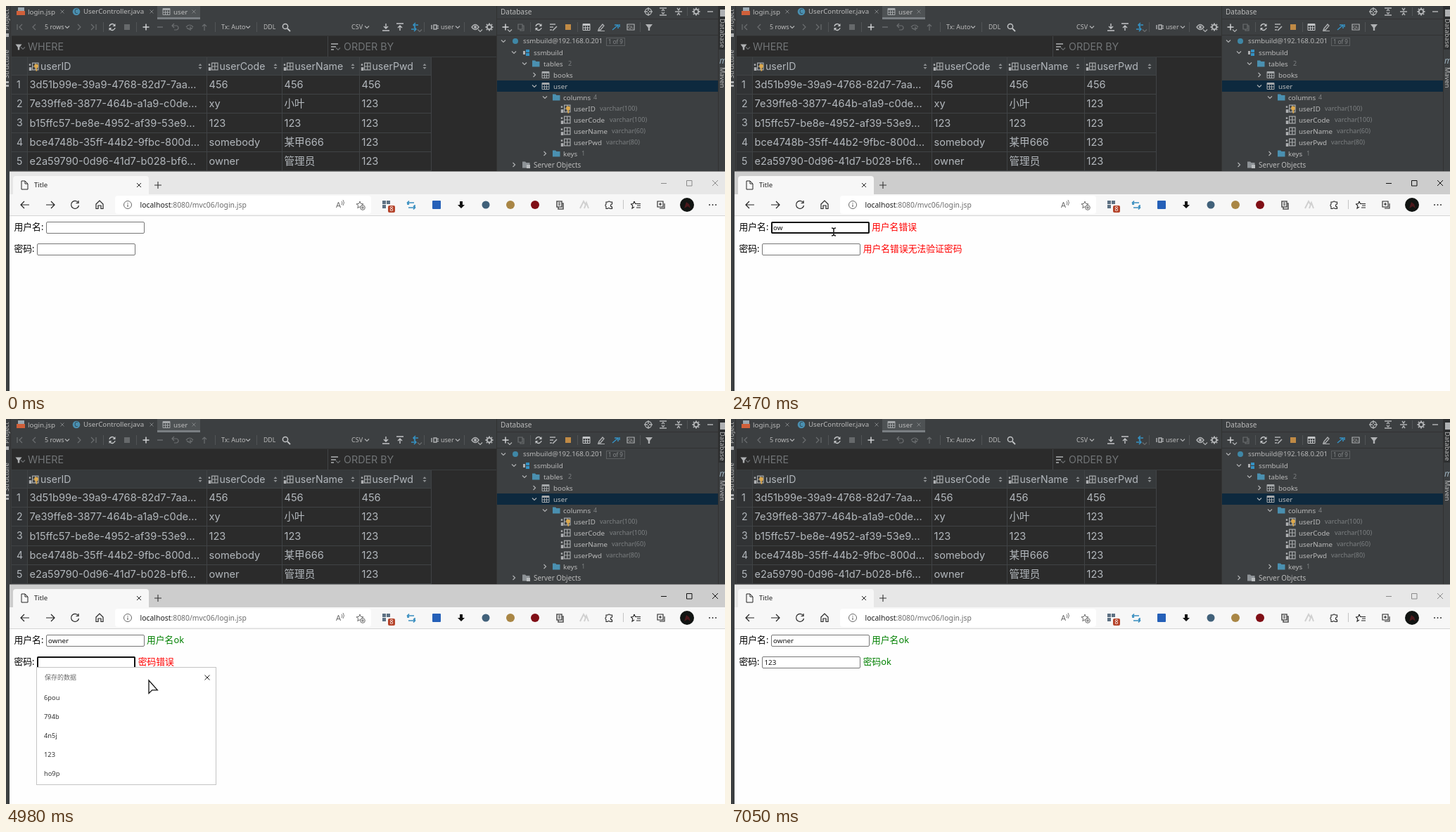
Write an HTML page that moves like this. It is 1022 by 548 pixels and loops after 7100 ms.

```html
<!DOCTYPE html>
<html lang="zh-CN">
<head>
<meta charset="utf-8">
<title>Login check</title>
<style>
  html, body { margin: 0; width: 100%; height: 100%; overflow: hidden; background: #3c3f41; }
  svg { display: block; font-family: "Noto Sans", "Noto Sans CJK SC", "Noto Sans CJK", sans-serif; }
  .grid { font-family: Inter, "Noto Sans CJK SC", "Noto Sans CJK", sans-serif; }
</style>
</head>
<body>
<script>
const LOOP = 7100;
const UI = '#bbbbbb', ICON = '#afb1b3', DIM = '#6b6e70', BLUE = '#3592c4', LINE = '#515456';

// Drawing helpers: each returns SVG markup; text is placed by its vertical centre.
const rect = (x, y, w, h, fill, extra = '') =>
  `<rect x="${x}" y="${y}" width="${w}" height="${h}" fill="${fill}" ${extra}/>`;
const text = (x, y, str, size = 9.8, fill = UI, extra = '') =>
  `<text x="${x}" y="${y + size * .36}" font-size="${size}" fill="${fill}" ${extra}>${str}</text>`;
const path = (x, y, d, color = ICON, width = 1.2, fill = 'none', extra = '') =>
  `<path transform="translate(${x} ${y})" d="${d}" stroke="${color}" stroke-width="${width}" fill="${fill}" ${extra}/>`;
const solid = (x, y, d, fill = ICON) => path(x, y, d, 'none', 0, fill);
const disc = (x, y, r, fill, stroke = 'none', width = 1, extra = '') =>
  `<circle cx="${x}" cy="${y}" r="${r}" fill="${fill}" stroke="${stroke}" stroke-width="${width}" ${extra}/>`;
const each = (list, draw) => list.map(draw).join('');

const chevronDown = (x, y, c = ICON) => path(x, y, 'M-3-1.5L0 1.5L3-1.5', c);
const chevronRight = (x, y, c = ICON) => path(x, y, 'M-1.5-3L1.5 0L-1.5 3', c);
const cross = (x, y, r, c, w = 1) => path(x, y, `M${-r}${-r}L${r} ${r}M${r} ${-r}L${-r} ${r}`, c, w);
const plus = (x, y, r, c = '#d0d2d4', w = 1.5) => path(x, y, `M${-r} 0H${r}M0 ${-r}V${r}`, c, w);
const bar = (x, y, h = 14) => rect(x, y - h / 2, 1, h, LINE);
const reload = (x, y) => path(x, y, 'M-4-1A4 4 0 0 1 3-3M4 1A4 4 0 0 1-3 3', '#c2c4c6', 1.4) +
  solid(x, y, 'M4.5-5V-1H.5ZM-4.5 5V1H-.5Z', '#c2c4c6');
const tableIcon = (x, y, c = '#a5a8aa') =>
  path(x, y, 'M-5-4.5H5V4.5H-5ZM-5 1H5M-1.5-1.5V4.5M1.5-1.5V4.5', c, 1) + rect(x - 5, y - 5, 10, 3, c);
const columnIcon = (x, y, key) => `<g transform="translate(${x} ${y}) scale(1.2)">` +
  path(0, 0, 'M-2-4H5V4H-2ZM1.5-4V4M-2 0H5', '#a5a8aa', 1) + rect(-6, -3, 2, 2, ICON) + rect(-6, 1, 3, 4, ICON) +
  (key ? disc(2.5, -.5, 2.4, '#dca84c') + rect(2, 0, 1.5, 5.5, '#dca84c') : '') + '</g>';
const folder = (x, y, c = '#4a90b0') => solid(x, y, 'M-5-4.5H-1L.5-3H5.5V4.5H-5Z', c);
const gear = (x, y) => disc(x, y, 3.2, 'none', ICON, 2) +
  path(x, y, 'M0-5.5V-4M0 4V5.5M-5.5 0H-4M4 0H5.5M-4-4L-3-3M3 3L4 4M4-4L3-3M-3 3L-4 4', ICON, 2);
const funnel = (x, y, r = 5) => solid(x, y, `M${-r}${-r + 1}H${r}L1.2 1V${r}H-1.2V1Z`);

function editorTabs() {
  return rect(215, 0, 61, 19, '#4e5254') + rect(215, 16, 61, 3, '#7a7f83') +
    rect(17, 2, 9, 10, '#9aa7b0') + rect(15, 7, 12, 6, '#d0603a') + text(31, 8, 'login.jsp') +
    disc(100, 8, 5.3, '#4a8fb0') + text(97.3, 8, 'C', 8, '#2b3e48') + text(110, 8, 'UserController.java', 9.7) +
    tableIcon(228, 8) + text(238, 8, 'user') +
    each([80, 207, 267], x => cross(x, 8, 2.5, '#7d8082'));
}

function gridToolbar() {
  const y = 30;
  return path(20, y, 'M-4-4V4M3-4L-1 0L3 4', DIM) + path(40, y, 'M2-4L-2 0L2 4', DIM) +
    text(55, y, '5 rows', 9) + chevronDown(87, y) + path(104, y, 'M-2-4L2 0L-2 4', DIM) +
    path(124, y, 'M4-4V4M-3-4L1 0L-3 4', DIM) + each([138, 185, 297, 356, 594, 651], x => bar(x, y)) +
    reload(151, y) + rect(168, 26, 8, 8, '#66696b') + plus(199, y, 4.5) + path(219, y, 'M-4 0H4', DIM, 1.4) +
    path(240, y, 'M-4-2H2A3 3 0 0 1 2 4H-1M-1-5L-4-2L-1 1', DIM) +
    path(261, y, 'M-5 0Q0-6 5 0M-4 1Q0 5 4 1M1-1V5', DIM) + path(282, y, 'M0 5V-4M-3-1L0-4L3-1', DIM) +
    text(306, y, 'Tx: Auto', 9) + chevronDown(344, y) + text(366, y, 'DDL', 8.7) +
    disc(397, 29, 3.6, 'none', '#c2c4c6', 1.5) + path(400, 32, 'M0 0L4 4', '#c2c4c6', 1.8) +
    text(491, y, 'CSV', 9) + chevronDown(513, y) +
    path(540, y, 'M0-5V2M-3-1L0 2L3-1M-5 5H5', '#c2c4c6', 1.4) + path(560, y, 'M0 5V-2M-3 1L0-2L3 1M-5-5H5', '#c2c4c6', 1.4) +
    path(581, y, 'M-5 3H1M-1 0L2 3L-1 6M5-3H-1M1-6L-2-3L1 0', BLUE, 1.5) + chevronDown(588, 35, DIM) +
    path(610, y, 'M-5-3V3M-2-3H2V3H-2ZM2-1.5H5M2 1.5H5', ICON, 1.4) + text(618, y, 'user', 9) + chevronDown(642, y) +
    path(667, y, 'M-5 0Q0-7 5 0Q0 7-5 0Z', ICON, 1.4) + disc(667, y, 2, ICON) + chevronDown(674, 35) + gear(687, y);
}

function dataGrid() {
  const columns = [30, 285, 392, 502, 604];
  const rows = [
    ['3d51b99e-39a9-4768-82d7-7aa...', '456', '456', '456'],
    ['7e39ffe8-3877-464b-a1a9-c0de...', 'xy', '小叶', '123'],
    ['b15ffc57-be8e-4952-af39-53e9...', '123', '123', '123'],
    ['bce4748b-35ff-44b2-9fbc-800d...', 'somebody', '某甲666', '123'],
    ['e2a59790-0d96-41d7-b028-bf6...', 'owner', '管理员', '123']
  ];
  const heads = ['userID', 'userCode', 'userName', 'userPwd'];
  const headSize = 14.1, cellSize = 14.6, ink = '#b3b8bd';
  return rect(8, 42, 690, 194, '#2b2b2b') + rect(8, 73, 596, 26, '#36393b') + rect(8, 99, 22, 137, '#313335') +
    rect(8, 42, 690, 1, '#323232') + rect(8, 72, 690, 1, '#3a3d3f') + rect(457, 43, 1, 29, '#414446') +
    funnel(18, 58, 4.5) + chevronDown(24, 60, DIM) + text(31, 58, 'WHERE', 14.3, '#717476') +
    path(467, 58, 'M-5-4H5M-5 0H2M-5 4H-1', ICON, 1.6) + chevronDown(472, 61, DIM) + text(480, 58, 'ORDER BY', 14.3, '#717476') +
    each(columns, x => rect(x, 73, 1, 162, '#404345')) +
    each([98, 125, 152, 180, 207, 234], y => rect(8, y, 596, 1, '#404345')) +
    each(heads, (h, i) => columnIcon(columns[i] + 10, 86, !i) + text(columns[i] + (i ? 18.5 : 19), 86, h, headSize, ink) +
      solid(columns[i + 1] - 9, 86, 'M-2.5-1L0-4L2.5-1ZM-2.5 1L0 4L2.5 1Z', '#8c8f91')) +
    each(rows, (row, r) => {
      const y = 112 + r * 27.2;
      return text(15, y, r + 1, headSize, ink) + each(row, (s, i) => text(columns[i] + 3.5, y, s, cellSize, ink));
    });
}

function databasePanel() {
  const leaf = (y, name, type, x, key) => columnIcon(796, y, key) + text(807, y, name) + text(x, y, type, 9.1, '#7d8082');
  return rect(697, 0, 1, 236, '#323232') + rect(698, 0, 314, 236, '#3c3f41') + rect(698, 18, 314, 1, '#323232') +
    rect(698, 41, 314, 1, '#323232') + text(703, 8, 'Database', 10) +
    disc(913, 8, 4.5, 'none', ICON, 1.3) + path(913, 8, 'M0-6V-1M0 1V6M-6 0H-1M1 0H6', ICON, 1.3) +
    path(934, 8, 'M-5-5H5M-5 5H5M-2-1L0-3L2-1M-2 1L0 3L2 1', ICON, 1.4) +
    path(956, 8, 'M-5 0H5M-2-5L0-2L2-5M-2 5L0 2L2 5', ICON, 1.4) + bar(968, 8, 12) + gear(981, 8) + path(1001, 8, 'M-4 0H4', ICON, 1.5) +
    plus(710, 30, 4.5) + chevronDown(716, 35) + path(732, 30, 'M-4-4H2V3H-4ZM-1 3V5H4V-2H2', DIM) + each([745, 812, 901], x => bar(x, 30)) +
    reload(757, 30) + path(778, 30, 'M-5-4H3M-5 0H0M-5 4H-2M-1 5L5-1', ICON, 1.7) + rect(795, 26, 8, 8, '#c08a45') + tableIcon(825, 30, '#c2c4c6') +
    path(846, 30, 'M-3 2L2-4L4-2L-1 4L-4 4Z', ICON, 1.3) + rect(841, 35, 10, 1, ICON) +
    path(867, 30, 'M-5 4L2-2M-2-3H3V2M5-4V0', BLUE, 1.5) + path(888, 30, 'M-5-4H5V4H-5Z', ICON) + text(884, 30, 'QL', 6, UI) + funnel(914, 30) +
    rect(698, 106, 314, 16, '#0d293e') +
    each([[707, 50], [722, 66], [737, 82], [751, 114], [766, 130]], p => chevronDown(...p)) +
    each([[751, 98], [766, 210], [722, 226]], p => chevronRight(...p)) +
    disc(724, 50, 4, '#3f87a6') + text(735, 50, 'ssmbuild@192.168.0.201', 9.7) +
    rect(853.5, 45.5, 26, 11, 'none', 'stroke="#5c5f61"') + text(856, 51, '1 of 9', 8, '#85888a') +
    rect(735, 64, 3, 5, ICON) + rect(739, 62, 5, 4, BLUE) + rect(739, 67, 5, 4, BLUE) + text(750, 66, 'ssmbuild') +
    folder(753, 82) + text(764, 82, 'tables') + text(799, 82, '2', 9, '#7d8082') +
    tableIcon(767, 98) + text(778, 98, 'books') + tableIcon(767, 114) + text(778, 114, 'user') +
    folder(782, 130) + text(792, 130, 'columns') + text(835, 130, '4', 9, '#7d8082') +
    leaf(146, 'userID', 'varchar(100)', 844, true) + leaf(162, 'userCode', 'varchar(100)', 858) +
    leaf(178, 'userName', 'varchar(60)', 861) + leaf(194, 'userPwd', 'varchar(80)', 853) +
    folder(782, 210) + text(792, 210, 'keys') + text(818, 210, '1', 9, '#7d8082') +
    folder(739, 226, '#8d9296') + rect(740, 226, 5, 5, '#b9bcbe') + text(750, 226, 'Server Objects', 9.9);
}

function sideStrips() {
  const turned = (x, y, angle, str, fill = UI) =>
    `<text transform="translate(${x} ${y}) rotate(${angle})" font-size="9.4" fill="${fill}">${str}</text>`;
  return rect(6, 0, 1, 236, '#323232') + turned(4, 35, -90, 'Project') + turned(4, 103, -90, 'Structure') +
    rect(0, 39, 4, 5, ICON) + rect(0, 107, 4, 3, ICON) + rect(0, 112, 4, 3, ICON) +
    rect(1012, 0, 10, 236, '#3c3f41') + rect(1012, 0, 10, 62, '#2d2f30') + rect(1012, 0, 1, 236, '#323232') +
    rect(1015, 5, 7, 10, ICON) + turned(1015, 18, 90, 'Database') + turned(1015, 87, 90, 'Maven') +
    text(1014, 78, 'm', 12, '#9fb4c0', 'font-style="italic"');
}

function browser() {
  const y = 283, ink = '#252525', grey = '#686868';
  const star = 'M0-5L1.5-1.5L5-1.2L2.3 1L3.2 4.6L0 2.7L-3.2 4.6L-2.3 1L-5-1.2L-1.5-1.5Z';
  return rect(5, 235, 1017, 313, '#fefefe') + rect(5, 235, 1017, 34, '#cdcdcd', 'id="titleBar"') + rect(5, 235, 1017, 1, '#8b8b8b') +
    rect(5, 268, 1017, 31, '#f7f7f7') + solid(0, 0, 'M10 269V246Q10 242 14 242H199Q203 242 203 246V269Z', '#f7f7f7') +
    path(26, 255, 'M-4-6H1L5-2V6H-4ZM1-6V-2H5', ink, 1) + text(40, 255, 'Title', 9.6, '#222') + cross(189, 255, 3, ink) + plus(216, 255, 5, '#333', 1.1) +
    `<g id="windowButtons">${path(935, 252, 'M-4 .5H4', 'currentColor', 1)}${path(971, 252, 'M-3.5-3.5H4V4H-3.5Z', 'currentColor', 1)}${cross(1008, 252, 4, 'currentColor')}</g>` +
    rect(5, 298, 1017, 1, '#d5d5d5') + path(27, y, 'M6 0H-6M-1-5L-6 0L-1 5', ink) + path(63, y, 'M-6 0H6M1-5L6 0L1 5', ink) +
    path(98, y, 'M4.5-3.5A5.5 5.5 0 1 0 5.5 1M5-6V-2.5H1.5', ink) + path(133, y, 'M-5-1L0-6L5-1V5.5H2V1H-2V5.5H-5Z', ink) +
    rect(155, 270, 364, 26, '#fff', 'rx="4"') + disc(173, y, 5.5, 'none', grey) + path(173, y, 'M0-.5V3M0-3V-1.8', grey) +
    text(190.5, y, 'localhost<tspan fill="#6d6d6d">:8080/mvc06/login.jsp</tspan>', 10.4, '#1b1b1b') +
    text(469, y, 'A', 11, grey) + path(477, 280, 'M0-2Q2 0 0 3M2-4Q5 0 2 4', grey, .9) +
    path(503, y, star, grey, 1) + disc(507, 287, 3.3, '#fff', grey) + plus(507, 287, 2, grey, 1) +
    each([[535, 277], [541, 277], [535, 283]], p => rect(...p, 5, 5, '#5d7183')) + rect(543, 284, 10, 10, '#b5432a', 'rx="2"') + text(545.4, 289, '8', 8.5, '#fff') +
    path(576, y, 'M-5 0V-3H4M-3-5.5L-5.5-3L-3-.5M5 0V4H-4M3 1.5L5.5 4L3 6.5', '#3a8fc0', 1.6) +
    rect(606, 277, 12, 12, '#2560b8', 'rx="1"') + solid(647, y, 'M-2-5H2V0H5L0 5L-5 0H-2Z', '#111') +
    disc(682, y, 5.5, '#41617a') + disc(717, y, 6, '#a98645') + disc(752, y, 6, '#800f16') +
    path(787, y, 'M-4-5H3V3H-4ZM3-2H5V6H-2V3M-2-2.5H1M-2 0H1', '#555', 1.6) + path(822, y, 'M-6 5L-1-5L2 0M0 5L3-3L6 5', '#d0d0d0', 2) +
    path(857, y, 'M-4-4H-1.5A2 2 0 0 1 2-4H4.5V-1A2 2 0 0 0 4.5 3V5.5H1.5A2 2 0 0 0-2 5.5H-4V2.5A2 2 0 0 1-4-1Z', ink, 1.1) +
    rect(877, 276, 1, 13, '#c4c4c4') + path(893, y, 'M0-5L1.5-1.5H4M-5-1.3L-1.5-1.5L0-5M-5-1.3L-2.3 1L-3 5L0 3M4 1H9M3 4H9M4-1.5H9', ink, 1.1) +
    path(931, y, 'M-5-5H3V3H-5ZM5-2V5H-2M-1-3V1M-3-1H1', ink, 1.1) +
    disc(968, y, 10, '#111412') + solid(968, y, 'M-4 5L-1-4L3-1L5 5L1 2Z', '#4c191c') +
    each([1000, 1004.5, 1009], x => disc(x, y, .95, ink));
}

function loginPage() {
  // The focus ring is a 2px stroke that shares the outer edge of the 1px border.
  const field = (id, x, y) => rect(x + .5, y + .5, 139, 16, '#fff', 'stroke="#767676" rx="1.5"') +
    rect(x + 1, y + 1, 138, 15, '#fff', `id="${id}" stroke="#101010" stroke-width="2" rx="1"`);
  return text(11.5, 314.5, '用户名:', 12.8, '#000') + text(11.5, 345.5, '密码:', 12.8, '#000') + field('userRing', 57, 307) + field('passRing', 44, 338) +
    text(60, 315.5, '', 9.8, '#111', 'id="userValue"') + text(47.5, 346.5, '', 9.8, '#111', 'id="passValue"') +
    rect(0, 0, 1, 12, '#111', 'id="caret"') + text(200, 314.5, '', 12.8, 'red', 'id="userNote"') +
    rect(188, 337, 51, 17, '#3390ff', 'id="selection"') + text(187.7, 345.5, '', 12.8, 'red', 'id="passNote"') +
    `<g id="saved">${rect(43.5, 353.5, 255, 167, '#fff', 'stroke="#c4c4c4"')}${text(55, 368, '保存的数据', 9, '#6a6a6a')}${cross(286, 368, 3.5, '#222')}` +
    rect(44, 464, 254, 27, '#efefef', 'id="hover"') +
    each(['6pou', '794b', '4n5j', '123', 'ho9p'], (s, i) => text(54, 396.5 + 27 * i, s, 9.3, '#333')) + '</g>' +
    `<g id="pointer">${disc(0, 0, 10, '#f3ea3c', 'none', 0, 'fill-opacity=".78" id="halo"')}` +
    path(0, 0, 'M0 0V18.5L4.7 13.8H12.3Z', '#111', 1.3, '#fff', 'id="arrow"') +
    path(0, 0, 'M-3-5Q0-5 0-3Q0-5 3-5M0-4V5M-3 6Q0 6 0 4Q0 6 3 6', '#222', 1.6, 'none', 'id="beam"') + '</g>';
}

document.body.innerHTML = '<svg width="1022" height="548" viewBox="0 0 1022 548">' + rect(0, 0, 1022, 548, '#3c3f41') +
  editorTabs() + gridToolbar() + `<g class="grid">${dataGrid()}</g>` + databasePanel() + sideStrips() + browser() + loginPage() + '</svg>';

const el = id => document.getElementById(id);
const show = (id, on) => el(id).setAttribute('visibility', on ? 'inherit' : 'hidden');
const within = (t, ...spans) => spans.some(([a, b]) => t >= a && t < b);
const latest = (t, steps) => steps.filter(s => s[0] <= t).pop();

// Pointer stops: time, x, y
const stops = [
  [30, 960, 546], [540, 129, 315], [840, 129, 315], [1190, 353, 385], [1290, 353, 385], [1540, 314, 326],
  [1840, 129, 312], [1930, 129, 312], [2130, 146, 321], [3720, 146, 321], [3890, 258, 408], [4020, 258, 408],
  [4470, 150, 346], [4580, 150, 346], [4980, 203, 372], [5190, 76, 476], [5270, 76, 476], [5470, 155, 330],
  [5540, 155, 330], [5900, 400, 500], [6030, 400, 500], [6650, 937, 508], [6890, 982, 548]
];
const presses = [[550, 650], [1200, 1290], [1850, 1930], [3890, 4020], [4490, 4570], [5200, 5260], [5950, 6030]];
const userFocus = [[570, 1200], [1850, 3890]], passFocus = [[4490, 5950]];
const carets = [[570, 1100], [1860, 2470], [2820, 3560], [4500, 4720], [5250, 5750]];
const typed = [[0, ''], [2110, 'o'], [2220, 'ow'], [2820, 'own'], [2960, 'owne'], [3060, 'owner']];
const userNotes = [[0, ''], [1240, '用户名错误', 'red'], [3910, '用户名ok', 'green']];
const passNotes = [[0, ''], [1240, '用户名错误无法验证密码', 'red'], [3910, '密码错误', 'red'], [6050, '密码ok', 'green']];

function pointerAt(t) {
  const i = stops.findIndex(s => s[0] > t);
  if (i < 1) return null;
  const [t0, x0, y0] = stops[i - 1], [t1, x1, y1] = stops[i];
  const u = (t - t0) / (t1 - t0), k = u * u * (3 - 2 * u);
  return [x0 + (x1 - x0) * k, y0 + (y1 - y0) * k];
}

function note(id, [, str, color]) {
  el(id).textContent = str;
  el(id).setAttribute('fill', color || 'red');
}

function render(t) {
  const active = within(t, [560, 7050]);
  el('titleBar').setAttribute('fill', active ? '#cdcdcd' : '#e7e7e7');
  el('windowButtons').setAttribute('color', active ? '#111' : '#8a8a8a');

  const inPass = within(t, ...passFocus);
  show('userRing', within(t, ...userFocus));
  show('passRing', inPass);
  el('userValue').textContent = latest(t, typed)[1];
  el('passValue').textContent = t >= 5250 ? '123' : '';
  note('userNote', latest(t, userNotes));
  note('passNote', latest(t, passNotes));

  const selected = within(t, [3910, 4490]);
  show('selection', selected);
  if (selected) el('passNote').setAttribute('fill', '#fff');

  const value = el(inPass ? 'passValue' : 'userValue');
  el('caret').setAttribute('x', Math.round(+value.getAttribute('x') + value.getComputedTextLength()));
  el('caret').setAttribute('y', inPass ? 340 : 309);
  show('caret', within(t, ...carets));

  const p = pointerAt(t);
  const listOpen = within(t, [4560, 5250]);
  show('saved', listOpen);
  show('pointer', p);
  if (p) {
    const [x, y] = p;
    const overField = (x > 57 && x < 197 && y > 307 && y < 324) || (x > 44 && x < 184 && y > 338 && y < 355);
    el('pointer').setAttribute('transform', `translate(${x.toFixed(1)} ${y.toFixed(1)})`);
    el('halo').setAttribute('cy', overField ? 0 : 2);
    show('halo', within(t, ...presses));
    show('beam', overField);
    show('arrow', !overField);
    show('hover', listOpen && x < 298 && y > 464 && y < 491);
  }
}

const start = performance.now();
function frame() {
  render((performance.now() - start) % LOOP);
  requestAnimationFrame(frame);
}
frame();
</script>
</body>
</html>
```
